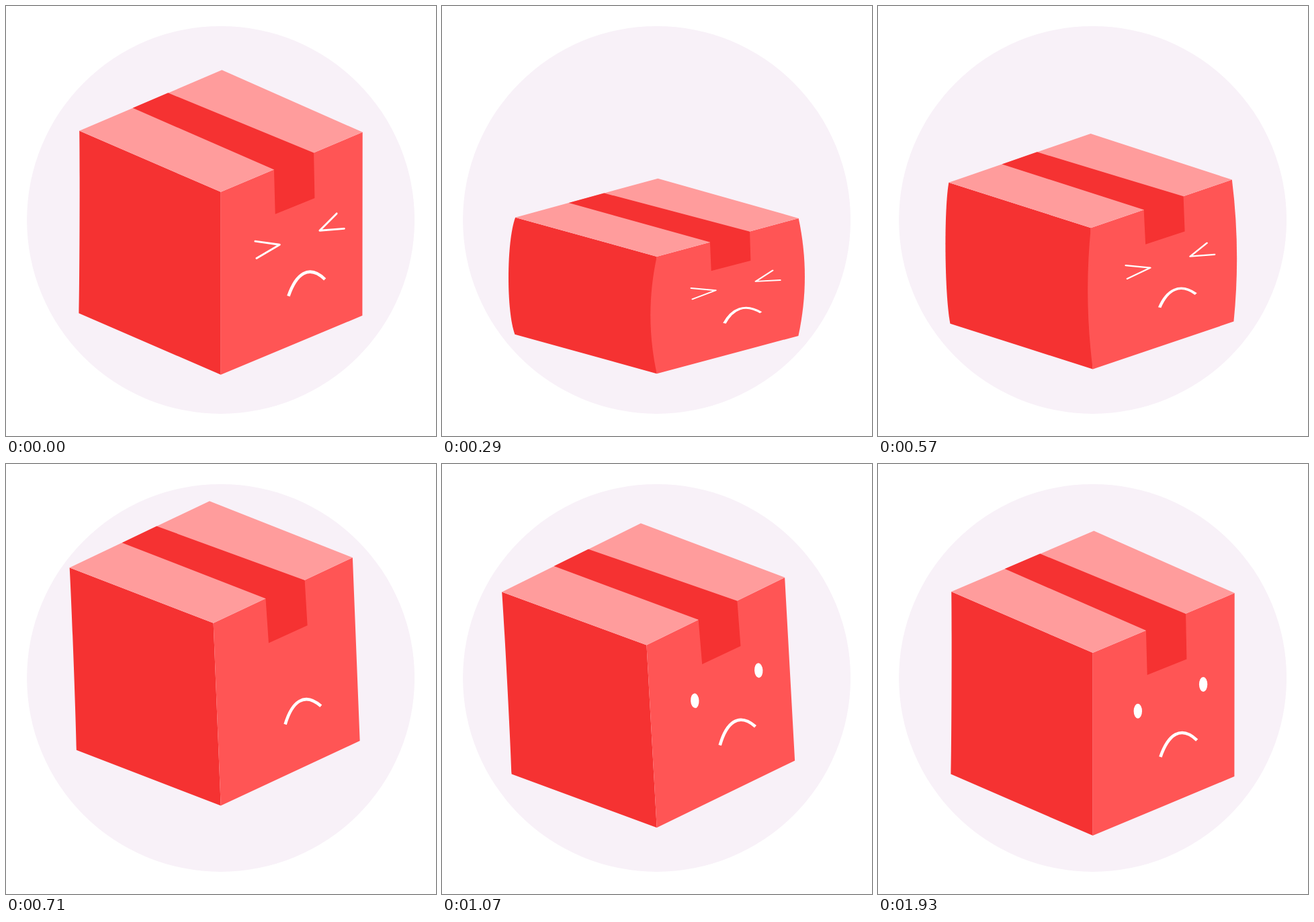
Recreate the animation shown at these times as an HTML page. Size 640 px wide and 640 px high, loop 3.57 s.

```html
<!DOCTYPE html>
<html lang="en">
<head>
<meta charset="utf-8">
<title>Sad box</title>
<style>
  html, body { margin: 0; height: 100%; overflow: hidden; background: #fff; }
  svg { display: block; width: 100%; height: 100%; }
</style>
</head>
<body>
<svg viewBox="0 0 640 640">
  <circle cx="319.6" cy="318.4" r="288.5" fill="#f8f1f8"/>
  <!-- The box stands with its lowest corner at 0,0 -->
  <g id="box">
    <path id="left" fill="#f53232"/>
    <path id="front" fill="#ff5555"/>
    <path fill="#ff9c9c" d="M1.6-453.5L211-361L0-272L-210.5-363Z"/>
    <path fill="#f53232" d="M-131-397L-78.5-419.5L138.4-330.2L139.7-262.7L81-239L79.2-305.4Z"/>
    <path fill="none" stroke="#fff" stroke-width="4.6" d="M100.7-117C112-150 131-165 155-142"/>
    <g id="squint" fill="none" stroke="#fff" stroke-width="2.9" stroke-linecap="round" stroke-linejoin="round">
      <path d="M51.2-198.7L87.6-193.6L53.2-173.2"/>
      <path d="M172.4-239.9L147.2-214.5L183.6-217.4"/>
    </g>
    <g fill="#fff">
      <ellipse class="eye" cx="67.1" cy="-185.3" rx="6.2" ry="11"/>
      <ellipse class="eye" cx="164.4" cy="-225.1" rx="6.2" ry="11"/>
    </g>
  </g>
</svg>
<script>
const LOOP = 3570, STEPS = 50;
const $ = id => document.getElementById(id);
const box = $('box'), left = $('left'), front = $('front'), squint = $('squint');
const eyes = document.querySelectorAll('.eye');

const ramp = (k, a, b) => Math.min(1, Math.max(0, (k - a) / (b - a)));
const ease = (k, a, b) => { const u = ramp(k, a, b); return u * u * (3 - 2 * u); };
// Rises from a to b, falls from c to d
const pulse = (k, a, b, c, d) => ease(k, a, b) - ease(k, c, d);

// Motion rules; k counts steps through the loop
const ground = k => 548.8 - 8.3 * ramp(k, 1, 8) ** 2 - 64 * ease(k, 8, 12) + 76.6 * ease(k, 12, 16);
const tilt = k => -3.4 * pulse(k, 6, 12.4, 14.5, 18);
const squash = k => 0.454 * pulse(k, 1, 5.25, 6, 10) + 0.22 * pulse(k, 17, 18, 18, 19);
const lids = k => ease(k, 10, 13) - pulse(k, 21, 24, 24, 27);

// Side edge that bows sideways; inset places the handles along it
function edge(x0, y0, x1, y1, bow, inset = 1 / 3) {
  const handle = u => `${x0 + (x1 - x0) * u + bow} ${y0 + (y1 - y0) * u}`;
  return `C${handle(inset)} ${handle(1 - inset)} ${x1} ${y1}`;
}

function draw(time) {
  const k = Math.floor((time % LOOP + 5) * STEPS / LOOP) % STEPS;
  const q = squash(k), bow = 35 * q;

  box.setAttribute('transform',
    `translate(319.7 ${ground(k)}) rotate(${tilt(k)}) scale(1 ${1 - q})`);
  left.setAttribute('d', 'M0-272L0 0L-211.3-91.5'
    + edge(-211.3, -91.5, -210.5, -363, 1 - 1.12 * bow, 0.2) + 'Z');
  front.setAttribute('d', 'M0-272' + edge(0, -272, 0, 0, -bow)
    + 'L210.7-88' + edge(210.7, -88, 211, -361, bow) + 'Z');

  squint.setAttribute('visibility', k < 10 ? 'visible' : 'hidden');
  eyes.forEach(eye => eye.setAttribute('ry', 11 * lids(k)));
}

const start = performance.now();
function tick() {
  draw(performance.now() - start);
  requestAnimationFrame(tick);
}
tick();
</script>
</body>
</html>
```
